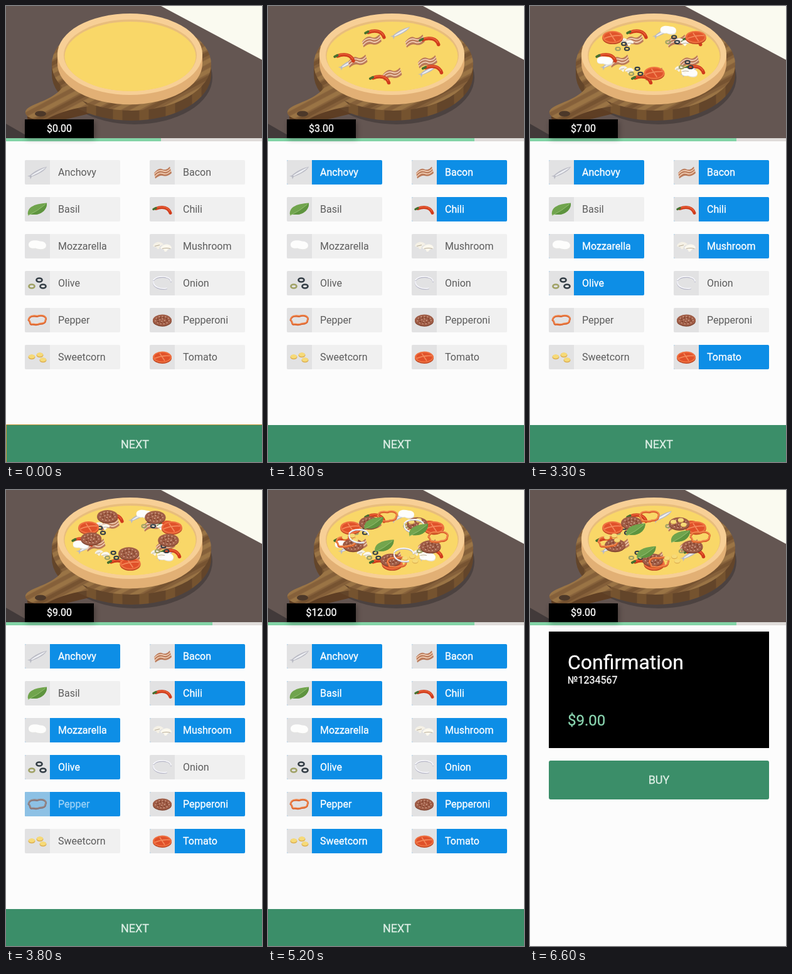
Write an HTML page that moves like this. It is 408x728 px and loops after 7300 ms.

```html
<!DOCTYPE html>
<html lang="en">
<head>
<meta charset="utf-8">
<title>Pizza builder</title>
<style>
  html, body { margin: 0; width: 100%; height: 100%; overflow: hidden; background: #fcfcfc; }
  svg { display: block; width: 408px; height: 728px; }
  text { font: 16px Roboto, sans-serif; fill: #fff; stroke: #fff; stroke-width: .3px; }
  .mid { text-anchor: middle; }
  .btn { font-size: 18px; fill: #deefe6; stroke: #deefe6; }
  .total { font-size: 24px; fill: #8ad5b0; stroke: #8ad5b0; }
  .off { fill: #5c5c5c; stroke: none; }
</style>
</head>
<body>
<svg viewBox="0 0 408 728">
  <defs>
    <clipPath id="scene"><path d="M0 0H408V211H0Z"/></clipPath>
    <filter id="soft" x="-20%" y="-50%" width="140%" height="200%"><feGaussianBlur stdDeviation="4"/></filter>
    <pattern id="wood" width="60" height="34" patternUnits="userSpaceOnUse" patternTransform="rotate(-28)">
      <path d="M0 0H60V34H0Z" fill="#85603a"/>
      <path d="M0 5H60M0 25H60" stroke="#9a7445" stroke-width="7"/>
      <path d="M0 14H60" stroke="#765331" stroke-width="6"/>
    </pattern>
    <pattern id="edge" width="42" height="60" patternUnits="userSpaceOnUse">
      <path d="M0 0H42V60H0Z" fill="#63452a"/>
      <path d="M10 0V60" stroke="#75532f" stroke-width="15"/>
    </pattern>

    <g id="Anchovy">
      <path d="M-12 5C-5-2 6-7 15-9C13-3 2 3-9 7L-11 11L-12 7L-16 6Z" fill="#b9bac4"/>
      <path d="M-10 5C-3 0 6-5 14-8C9-3 0 2-9 6Z" fill="#eeeff3"/>
    </g>
    <g id="Bacon" fill="none" transform="skewY(-10)">
      <path d="M-13-1Q-6-9 0-5T12-7L15 4Q8 9 2 6T-11 8Z" fill="#bb7a59"/>
      <path d="M-13 1Q-6-6 1-2T13-4M-12 5Q-5-2 1 2T14 0" stroke="#f1cfb6" stroke-width="1.6"/>
    </g>
    <g id="Basil">
      <path d="M-15 9C-17-5-1-9 15-10C16 1 5 11-11 8Z" fill="#70a44d"/>
      <path d="M-15 9C-5 6 5 0 15-10C16 1 5 11-11 8Z" fill="#5e943f"/>
      <path d="M-15 10Q0 3 13-8" fill="none" stroke="#92bd70"/>
    </g>
    <g id="Chili" fill="none" stroke-linecap="round">
      <path d="M-10-1C0-5 10-3 13 6" stroke="#d03c1c" stroke-width="5"/>
      <path d="M-9-2C0-6 9-3 12 3" stroke="#ea6238" stroke-width="1.5"/>
      <path d="M-14 0L-10-2" stroke="#46702f" stroke-width="3.5"/>
    </g>
    <g id="Mozzarella">
      <path id="blob" d="M-14-2C-13-9-3-9 4-7C12-7 16-1 13 4C9 8 2 6-3 4C-11 5-14 3-14-2Z" fill="#e4e4e2"/>
      <path d="M-14-3C-13-10-3-10 4-8C12-8 16-3 13 2C9 6 2 5-3 3C-11 4-14 2-14-3Z" fill="#fdfdfc"/>
    </g>
    <g id="Mushroom">
      <path d="M-15 0C-13-8-2-9 2-3L-4 0L-5 4Q-8 6-9 2Z" fill="#f5f1e6"/>
      <path d="M-3 3C1-5 14-5 15 3L9 5L7 8Q3 10 3 6Z" fill="#fbf8ee"/>
      <path d="M-12 0L-4-2M0 4Q7 2 13 4" fill="none" stroke="#b8ad98" stroke-width="1.2"/>
    </g>
    <g id="Olive" fill="none" stroke-width="2.7">
      <ellipse cx="3" cy="-5" rx="4.5" ry="3" stroke="#343e46"/>
      <ellipse cx="9" cy="5" rx="4.5" ry="3" stroke="#343e46"/>
      <ellipse cx="-9" cy="5" rx="4.5" ry="3" stroke="#a0a266"/>
    </g>
    <g id="Onion" fill="none" stroke-linecap="round">
      <path d="M-14-4C-8-12 13-11 14-2M-14-2C-15 7-3 11 7 9" stroke="#b4b4c4" stroke-width="1.7"/>
      <path d="M-14-5C-8-13 13-12 14-3M-14-3C-15 6-3 10 7 8" stroke="#fafafe" stroke-width="1.5"/>
    </g>
    <g id="Pepper" fill="none">
      <path d="M-14 0C-13-7-6-7 0-6C8-9 16-5 13 0C13 5 8 6 4 6C-2 9-5 6-9 7C-13 7-10 3-14 0Z" stroke="#d95f2a" stroke-width="2.8"/>
      <path d="M-14-1C-13-8-6-8 0-7C8-10 16-6 13-1C13 4 8 5 4 5C-2 8-5 5-9 6C-13 6-10 2-14-1Z" stroke="#f28a50" stroke-width="1.5"/>
    </g>
    <g id="Pepperoni" fill="none" stroke-width="1.6">
      <ellipse cy="1.2" rx="15" ry="9" fill="#7a402c"/>
      <ellipse rx="15" ry="9" fill="#9f5c46"/>
      <ellipse rx="11" ry="6" stroke="#d3a48d" stroke-dasharray="1.6 3.4"/>
      <ellipse rx="8" ry="4" stroke="#7b3e2a" stroke-dasharray="2 3"/>
      <ellipse rx="4" ry="2" stroke="#d3a48d" stroke-dasharray="1.6 3"/>
    </g>
    <g id="kernel">
      <ellipse cy="1" rx="5.500" ry="3.800" fill="#dcae50"/>
      <ellipse rx="5" ry="3.300" fill="#f6da78"/>
    </g>
    <g id="Sweetcorn">
      <use href="#kernel" x="-9" y="-1"/><use href="#kernel" x="4" y="-4"/><use href="#kernel" x="9" y="4"/>
    </g>
    <g id="Tomato">
      <ellipse cy="1.500" rx="15" ry="9" fill="#bd4320"/>
      <ellipse rx="15" ry="9" fill="#ef7040"/>
      <ellipse rx="12.500" ry="7" fill="#e0512a"/>
      <path d="M-12 2Q0-3 12-2M-4-6L4 6" fill="none" stroke="#f4895a" stroke-width="1.6"/>
    </g>
  </defs>

  <path d="M0 0H408V728H0Z" fill="#fcfcfc"/>

  <g clip-path="url(#scene)">
    <path d="M0 0H408V211H0Z" fill="#645652"/>
    <path d="M247 0H408V86Z" fill="#fafaf0"/>
    <path d="M0 188L40 211H0Z" fill="#423a3a"/>
    <ellipse cx="205" cy="114" rx="124" ry="75" fill="#4c4240"/>
    <path d="M34 168V180Q50 192 66 188L132 172V155Z" fill="#5e3e24"/>
    <path d="M73 93V109A127 74 0 0 0 327 109V93Z" fill="url(#edge)"/>
    <g fill="url(#wood)">
      <ellipse cx="200" cy="93" rx="127" ry="74"/>
      <path d="M92 126C82 146 52 153 38 161Q26 168 34 176Q48 185 66 180C88 168 110 163 132 160Z"/>
    </g>
    <ellipse cx="55" cy="172" rx="9" ry="4.500" fill="#4c3829"/>
    <path d="M82 78V92A115 65 0 0 0 313 92V78Z" fill="#e2b075"/>
    <ellipse cx="197.500" cy="77" rx="115.500" ry="65" fill="#f7cf96"/>
    <ellipse cx="198" cy="78.500" rx="106" ry="57" fill="#e8bd7c"/>
    <ellipse cx="198" cy="80.500" rx="104.500" ry="55.500" fill="#f9d768"/>
    <g id="toppings"></g>
  </g>

  <path d="M0 211H408V216H0Z" fill="#dfdcda"/>
  <rect id="bar" y="211" height="5" fill="#82d4a6"/>
  <path d="M32 185H142V213H32Z" opacity=".3" filter="url(#soft)"/>
  <path d="M30 181H140V211H30Z"/>
  <text id="price" class="mid" x="85" y="201"></text>

  <g id="list">
    <path d="M0 669H408V728H0Z" fill="#3b8e69"/>
    <path id="focus" d="M.5 728V668.500H408" fill="none" stroke="#c99a3c"/>
    <text class="mid btn" x="205.500" y="706">NEXT</text>
  </g>

  <g id="confirm">
    <path d="M30 226H381V412H30Z"/>
    <text x="60" y="286" style="font-size:32px">Confirmation</text>
    <text x="60" y="309">№1234567</text>
    <text id="total" class="total" x="60" y="376"></text>
    <rect x="30" y="432" width="351" height="62" rx="3" fill="#3b8e69"/>
    <text class="mid btn" x="205.500" y="469">BUY</text>
  </g>
</svg>

<script>
const LOOP = 7300, TICK = 100, DROP = 165;
const $ = id => document.getElementById(id);
const clamp = v => Math.max(0, Math.min(1, v));

// The pieces of a topping lie evenly on a ring, turned by some degrees
const topping = (name, on, pieces, turn, reach, size = 1.1) =>
  ({ name, on, off: Infinity, pieces, turn, reach, size });

const items = [
  topping('Anchovy', 800, 3, 160, .83, 1),
  topping('Bacon', 1100, 5, 91, .65),
  topping('Basil', 4800, 3, 107, .48, 1),
  topping('Chili', 1300, 5, 33, .85),
  topping('Mozzarella', 1900, 3, 166, .9, .9),
  topping('Mushroom', 2100, 4, 45, .7, .8),
  topping('Olive', 2300, 4, 120, .65, .8),
  topping('Onion', 4600, 3, 70, .6),
  topping('Pepper', 3700, 4, -6, .82),
  topping('Pepperoni', 3400, 5, 308, .72),
  topping('Sweetcorn', 4100, 3, 65, .75, .9),
  topping('Tomato', 2900, 3, 90, .85)
];

['Mozzarella', 'Mushroom', 'Onion'].forEach((name, i) => {
  items.find(item => item.name === name).off = 5500 + 400 * i;
});

function add(parent, tag, attrs, text = '') {
  const node = document.createElementNS('http://www.w3.org/2000/svg', tag);
  for (const key in attrs) node.setAttribute(key, attrs[key]);
  node.textContent = text;
  return parent.appendChild(node);
}

items.forEach((item, i) => {
  const x = i % 2 ? 229 : 30, y = 246 + 59 * (i >> 1);
  const row = add($('list'), 'g', { transform: `translate(${x} ${y})` });
  const box = { width: 152, height: 39, rx: 2 };
  item.back = add(row, 'rect', box);
  add(row, 'path', { d: 'M40 0H2Q0 0 0 2V37Q0 39 2 39H40Z', fill: '#e2e2e3' });
  add(row, 'use', { href: '#' + item.name, x: 20, y: 19.5 });
  item.label = add(row, 'text', { x: 53, y: 25 }, item.name);
  item.flash = add(row, 'rect', { ...box, fill: '#0d8ee6' });
});

// Later additions lie on top
[...items].sort((a, b) => a.on - b.on).forEach(item => {
  item.layer = add($('toppings'), 'g', {});
  for (let k = 0; k < item.pieces; k++) {
    const angle = (item.turn + 360 * k / item.pieces) * Math.PI / 180;
    const x = 198 + 90 * item.reach * Math.cos(angle);
    const y = 79 + 45 * item.reach * Math.sin(angle);
    add(item.layer, 'use', { href: '#' + item.name, transform: `translate(${x} ${y}) scale(${item.size})` });
  }
});

function drawItem(item, t) {
  const leaving = t >= item.off;
  const chosen = t >= item.on && !leaving;
  item.back.setAttribute('fill', chosen ? '#0d8ee6' : '#f0f0f0');
  item.label.setAttribute('class', chosen ? '' : 'off');

  const since = t - (leaving ? item.off : item.on);
  item.flash.setAttribute('opacity', since < 0 ? 0 : .6 * clamp(1 - since / 300));

  const u = leaving ? clamp(since / 300) : clamp((since - 100) / 400);
  const lift = leaving ? u ** 3 : (1 - u) ** 2;
  item.layer.setAttribute('transform', `translate(0 ${-DROP * lift})`);
  item.layer.setAttribute('opacity', leaving ? 1 - u : clamp(u * 1.3));
  return chosen;
}

function draw(t) {
  const count = items.filter(item => drawItem(item, t)).length;
  $('price').textContent = $('total').textContent = `$${count}.00`;

  const grow = 1 - (1 - clamp((t - 700) / 400)) ** 2;
  $('bar').setAttribute('width', 247 + 82 * grow);
  $('focus').setAttribute('opacity', t < 800 ? 1 : 0);

  const page = clamp((t - 6400) / 200);
  $('list').setAttribute('opacity', 1 - page);
  $('confirm').setAttribute('opacity', page);
}

const start = performance.now();
function frame() {
  const t = (performance.now() - start) % LOOP;
  draw(Math.floor(t / TICK) * TICK);
  requestAnimationFrame(frame);
}
frame();
</script>
</body>
</html>
```
